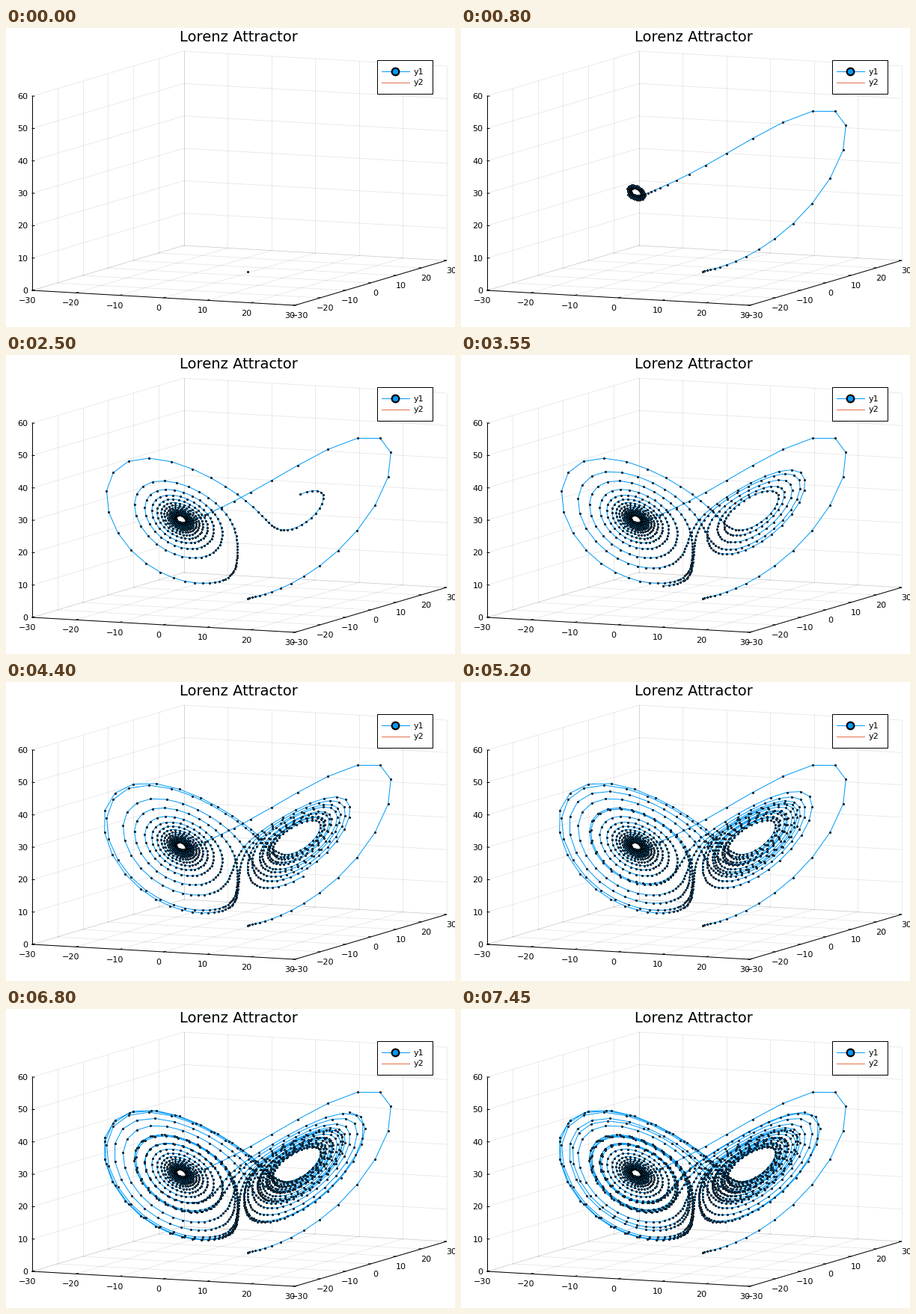
A matplotlib script that plays this animation: 600x400 px, repeating every 7500 ms.

```python
import numpy as np
import matplotlib.pyplot as plt
from matplotlib.animation import FuncAnimation
from matplotlib.patches import Rectangle

W, H, DPI = 600, 400, 100
PX = 72 / DPI  # one pixel in points
FRAMES, EVERY = 150, 10
BLUE, ORANGE = "#009af9", "#e26f46"

plt.rcParams["font.family"] = "DejaVu Sans"


def project(x, y, z):
    """Orthographic view: data coordinates to stage pixels."""
    u, v = np.add(x, 30) / 60, np.add(y, 30) / 60
    return (35 + 351 * u + 202.5 * v,
            351 + 20 * u - 60 * v - 260 * np.divide(z, 60))


def lorenz(steps, dt=0.02, sigma=10.0, rho=28.0, beta=8 / 3):
    """Euler steps where each coordinate uses the ones already updated."""
    x = y = z = 1.0
    path = np.empty((steps, 3))
    for i in range(steps):
        x += dt * (sigma * (y - x))
        y += dt * (x * (rho - z) - y)
        z += dt * (x * y - beta * z)
        path[i] = x, y, z
    return path


fig = plt.figure(figsize=(W / DPI, H / DPI), dpi=DPI, facecolor="white")
ax = fig.add_axes([0, 0, 1, 1])
ax.set_xlim(0, W)
ax.set_ylim(H, 0)
ax.axis("off")


def segment(a, b, **style):
    (x0, y0), (x1, y1) = project(*a), project(*b)
    ax.plot([x0, x1], [y0, y1], **{"lw": PX, "color": "black", **style})


def label(x, y, text, size=8, ha="center", **style):
    ax.text(x, y, text, fontsize=size, ha=ha, va="baseline", **style)


def number(n):
    return str(n).replace("-", "\u2212")


grid = dict(alpha=0.1, lw=0.8 * PX, zorder=1)
for t in range(-30, 31, 10):
    segment((t, -30, 0), (t, 30, 0), **grid)
    segment((t, 30, 0), (t, 30, 60), **grid)
    segment((-30, t, 0), (30, t, 0), **grid)
    segment((-30, t, 0), (-30, t, 60), **grid)
    segment((t, -30, 0), (t, -29.2, 0))
    segment((30, t, 0), (29.5, t, 0))
    x, y = project(t, -30, 0)
    label(x - 6.5, y + 17, number(t))
    x, y = project(30, t, 0)
    label(x + 6.5, y + 17, number(t))

for t in range(0, 61, 10):
    segment((-30, -30, t), (-30, 30, t), **grid)
    segment((-30, 30, t), (30, 30, t), **grid)
    segment((-30, -30, t), (-29.5, -30, t))
    x, y = project(-30, -30, t)
    label(x - 5.5, y + 4, number(t), ha="right")

segment((-30, -30, 0), (30, -30, 0))
segment((30, -30, 0), (30, 30, 0))
segment((-30, -30, 0), (-30, -30, 60))

label(310.8, 18, "Lorenz Attractor", size=14)

# Legend
ax.add_patch(Rectangle((495.5, 42.5), 74, 45, fc="white", ec="black",
                       lw=PX, zorder=6))
for y, color, name in ((57.5, BLUE, "y1"), (72.5, ORANGE, "y2")):
    ax.plot([501.5, 538.5], [y, y], color=color, lw=PX, zorder=7)
    label(544.5, y + 4, name, ha="left", zorder=7)
ax.plot([520], [57.5], "o", ms=9.6 * PX, mfc=BLUE, mec="black",
        mew=2.2 * PX, zorder=8)

px, py = project(*lorenz(FRAMES * EVERY).T)
trail, = ax.plot([], [], "-o", color=BLUE, lw=PX, ms=2 * PX, mfc=BLUE,
                 mec="black", mew=PX, solid_joinstyle="round", zorder=4)


def update(frame):
    n = frame * EVERY + 1
    trail.set_data(px[:n], py[:n])
    return trail,


anim = FuncAnimation(fig, update, frames=FRAMES, interval=50, repeat=True,
                     repeat_delay=0, blit=False)
plt.show()
```
